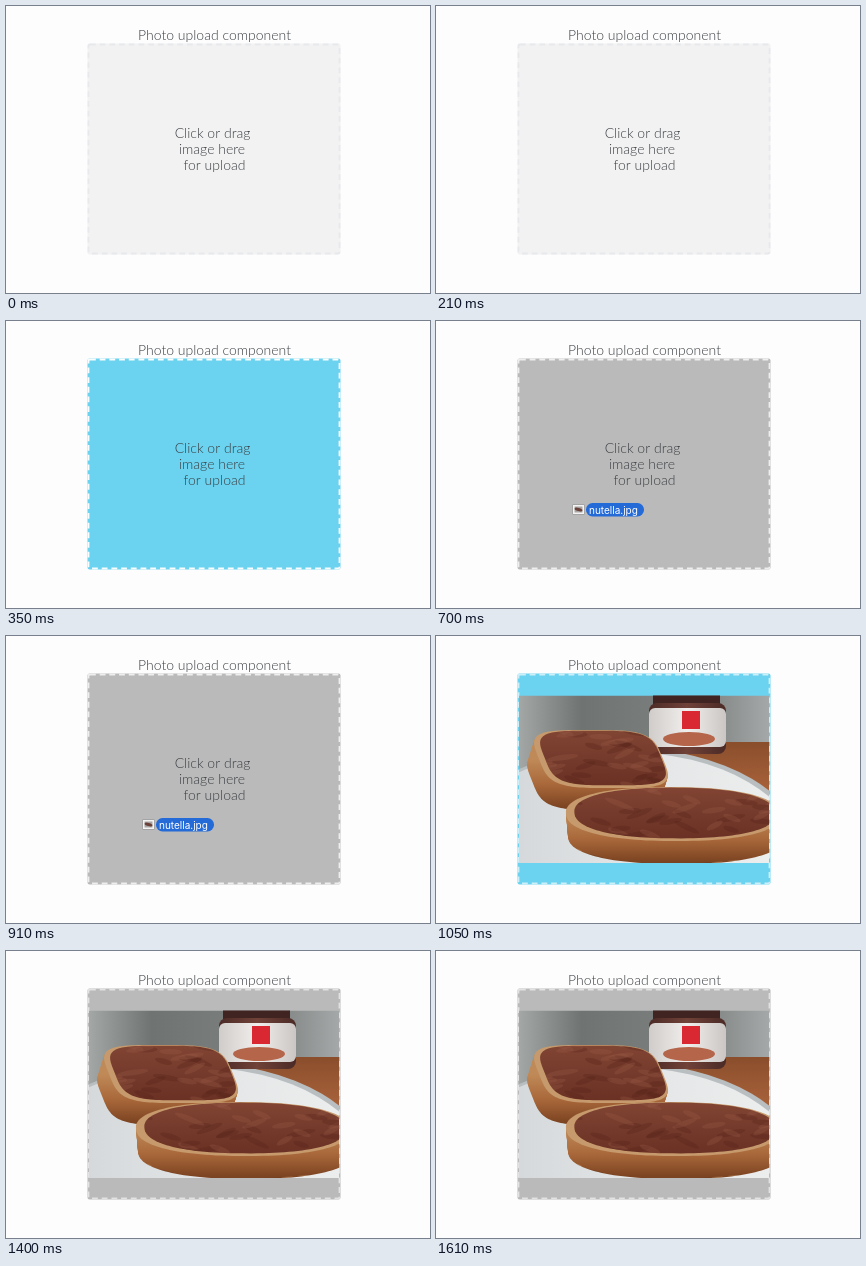
An HTML page with a canvas for the animation above (1.75 s loop, 424 by 287 pixels).

```html
<!DOCTYPE html>
<html lang="en">
<head>
<meta charset="utf-8">
<title>Photo upload component</title>
<style>
  html, body { margin: 0; width: 100%; height: 100%; overflow: hidden; background: #fdfdfd; }
  canvas { display: block; width: 424px; height: 287px; }
</style>
</head>
<body>
<canvas id="stage"></canvas>
<script>
const W = 424, H = 287, STEP = 350;
const canvas = document.getElementById('stage');
const ratio = window.devicePixelRatio || 1;
canvas.width = W * ratio;
canvas.height = H * ratio;
const ctx = canvas.getContext('2d');
ctx.scale(ratio, ratio);

const BOX = { x: 81.5, y: 37.5, w: 253, h: 211 };
const PHOTO = { x: 83, y: 59.5, w: 250, h: 167.5 };
const BLUE = '#6bd2ef', GREY = '#bababa';

const states = [
  { fill: '#f2f2f2', dash: '#e8e9ed' },
  { fill: BLUE, dash: '#fafdfe' },
  { fill: GREY, dash: '#eeeeee', file: true },
  { fill: BLUE, dash: '#cdeff9', photo: true },
  { fill: GREY, dash: '#e2e2e2', photo: true }
];

function rect(color, x, y, w, h) {
  ctx.fillStyle = color;
  ctx.fillRect(x, y, w, h);
}

function pill(color, x, y, w, h, r) {
  ctx.fillStyle = color;
  ctx.beginPath();
  ctx.roundRect(x, y, w, h, r);
  ctx.fill();
}

function ellipse(color, x, y, rx, ry, turn = 0) {
  ctx.fillStyle = color;
  ctx.beginPath();
  ctx.ellipse(x, y, rx, ry, turn, 0, Math.PI * 2);
  ctx.fill();
}

// Gradient with evenly spaced stops.
function ramp(x0, y0, x1, y1, ...colors) {
  const g = ctx.createLinearGradient(x0, y0, x1, y1);
  colors.forEach((c, i) => g.addColorStop(i / (colors.length - 1), c));
  return g;
}

function seeded(seed) {
  return () => (seed = seed * 16807 % 2147483647) / 2147483647;
}

function text(str, x, y, font, color, align = 'center') {
  ctx.font = font;
  ctx.fillStyle = color;
  ctx.textAlign = align;
  ctx.fillText(str, x, y);
}

const label = (str, x, y) => text(str, x, y, '300 14px Lato, sans-serif', '#3a3e42');

function drawBox({ fill, dash }) {
  const { x, y, w, h } = BOX;
  pill(fill, x, y, w, h, 2);
  ctx.strokeStyle = dash;
  ctx.lineWidth = 1.8;
  ctx.setLineDash([5.8, 3.9]);
  ctx.beginPath();
  ctx.roundRect(x + 1, y + 1, w - 2, h - 2, 1.5);
  ctx.stroke();
  ctx.setLineDash([]);
}

function drawFile() {
  rect('#8f8f8f', 136.5, 183.5, 12, 10);
  rect('#f4f4f4', 137, 184, 11, 9);
  rect('#a8a6a4', 138.5, 185.5, 8, 6);
  ellipse('#6a4039', 142.5, 188.5, 4, 1.6, 0.25);
  pill('#256bd8', 150, 182, 58, 13.5, 6.5);
  text('nutella.jpg', 153, 192.5, '10px Inter, sans-serif', '#ffffff', 'left');
}

// Superellipse outline, leaning to the right by skew towards the bottom.
function face({ x, y, rx, ry, power, skew }, scale = 1, dx = 0, dy = 0) {
  const path = new Path2D();
  const bend = v => Math.sign(v) * Math.abs(v) ** (2 / power);
  for (let a = 0; a < Math.PI * 2; a += 0.05) {
    const u = bend(Math.cos(a)) * rx * scale;
    const v = bend(Math.sin(a)) * ry * scale;
    path.lineTo(x + dx + u + v * skew, y + dy + v);
  }
  path.closePath();
  return path;
}

// Soft random streaks kept inside a path.
function mottle(path, { x, y, rx, ry }, count, colors, size) {
  const random = seeded(Math.round(x * 31 + count));
  ctx.save();
  ctx.clip(path);
  ctx.globalAlpha = 0.3;
  for (let i = 0; i < count; i++) {
    ellipse(colors[i % colors.length], x + (random() * 2 - 1) * rx,
      y + (random() * 2 - 1) * ry, size * (1 + random()), size * 0.35, random() - 0.5);
  }
  ctx.restore();
}

function drawToast(slice) {
  const { y, ry, depth, lean } = slice;
  ctx.fillStyle = ramp(0, y, 0, y + ry + depth, '#c08a58', '#a9683a', '#77401f');
  for (let d = depth; d > 0; d--) {
    const side = face(slice, 1, lean * d / depth, d);
    ctx.fill(side);
    if (d === depth) mottle(side, { ...slice, y: y + ry }, 40, ['#d9a870', '#64341f'], 5);
  }
  ctx.fillStyle = '#c69a6c';
  ctx.fill(face(slice));
  const spread = face(slice, 0.94, 2, -1);
  ctx.fillStyle = ramp(0, y - ry, 0, y + ry, '#824534', '#743a2b', '#6a3023');
  ctx.fill(spread);
  mottle(spread, slice, 36, ['#9a5a45', '#552219'], 8);
}

function drawJar() {
  pill('#3f2422', 217, 52, 67, 24, 4);
  pill(ramp(212, 0, 290, 0, '#4b2a26', '#704238', '#4b2a26'), 213, 67, 77, 51, 8);
  pill(ramp(212, 0, 290, 0, '#cfcbc9', '#f0eeec', '#cbc6c4'), 213, 72, 77, 39, 6);
  rect('#d92832', 246, 75, 18, 18);
  ellipse('#b5654a', 253, 103, 26, 7);
}

function drawPhoto() {
  const { x, y, w, h } = PHOTO;
  ctx.save();
  ctx.beginPath();
  ctx.rect(x, y, w, h);
  ctx.clip();
  rect(ramp(x, 0, x + w, 0, '#a3a7a6', '#6f7473', '#777b7a', '#7f8382', '#a5a8a8'), x, y, w, h);
  rect(ramp(0, 106, 0, 155, '#8a4e2c', '#a8623a'), 235, 106, 100, 60);
  ellipse('#b9bec1', 190, 217, 178, 105);
  ellipse(ramp(x, 0, x + w, 0, '#d5d9db', '#e4e6e7', '#eceded'), 188, 219, 176, 103);
  drawJar();
  drawToast({ x: 165, y: 123, rx: 62, ry: 29, power: 4, skew: 0.4, depth: 22, lean: -7 });
  drawToast({ x: 237, y: 178, rx: 107, ry: 27, power: 2.3, skew: 0.1, depth: 23, lean: 2 });
  ctx.restore();
}

function draw(time) {
  const state = states[Math.floor(time / STEP) % states.length];
  rect('#fdfdfd', 0, 0, W, H);
  drawBox(state);
  label('Photo upload component', 208.5, 34);
  if (state.photo) {
    drawPhoto();
  } else {
    label('Click or drag', 206.5, 132);
    label('image here', 206, 148);
    label('for upload', 208.5, 164);
  }
  if (state.file) drawFile();
}

const start = performance.now();
function tick() {
  draw(performance.now() - start);
  requestAnimationFrame(tick);
}
tick();
</script>
</body>
</html>
```
